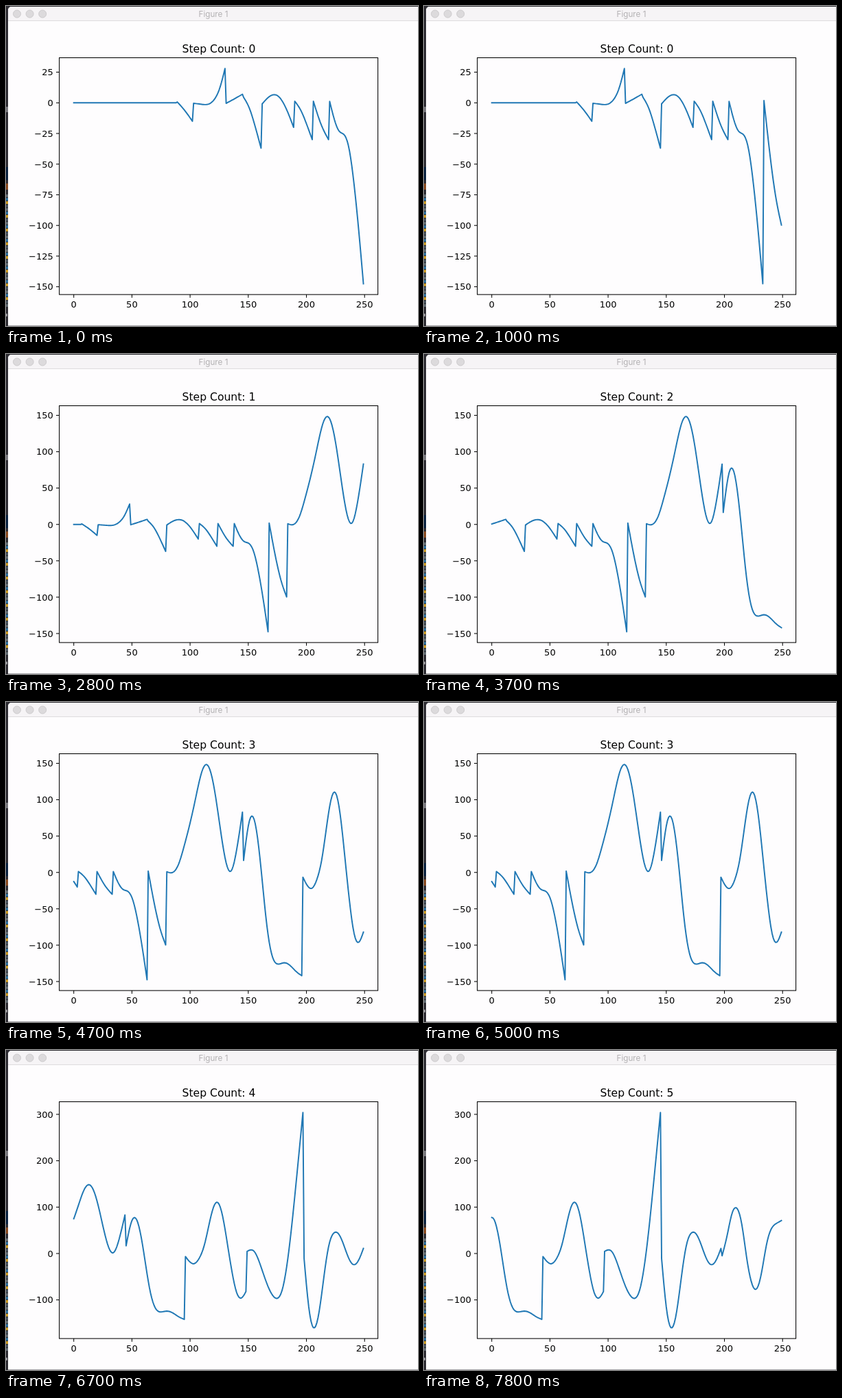
An HTML page with a canvas that plays this animation: 600 by 467 pixels, repeating every 8000 ms.

```html
<!DOCTYPE html>
<html lang="en">
<head>
<meta charset="utf-8">
<title>Figure 1</title>
<style>
html, body { margin: 0; width: 100%; height: 100%; overflow: hidden; background: #fefdfe; }
canvas { display: block; }
</style>
</head>
<body>
<canvas id="stage" width="600" height="467"></canvas>
<script>
const ctx = document.getElementById('stage').getContext('2d');
const LOOP = 8000, SPAN = 250;
const AXES = { x: 77.6, y: 75.5, w: 464, h: 345.6 };
const INK = '#000', LINE = '#1f77b4';

// Each episode is a natural cubic spline through evenly spaced knots, ending at sample `end`.
const signal = [];
function episode(end, ...v) {
  const start = signal.length, last = v.length - 1;
  const m = v.map(() => 0);
  for (let pass = 0; pass < 40; pass++)
    for (let i = 1; i < last; i++)
      m[i] = (6 * (v[i - 1] - 2 * v[i] + v[i + 1]) - m[i - 1] - m[i + 1]) / 4;
  for (let g = start; g <= end; g++) {
    const u = (g - start) / (end - start) * last;
    const i = Math.min(Math.floor(u), last - 1);
    const b = u - i, a = 1 - b;
    signal.push(a * v[i] + b * v[i + 1] + ((a ** 3 - a) * m[i] + (b ** 3 - b) * m[i + 1]) / 6);
  }
}
episode(88, 0, 0);
episode(102, 0.7, -6.4, -15);
episode(130, -0.4, -0.9, -1.4, -0.8, 3, 12, 28);
episode(145, -0.4, 3.2, 7);
episode(161, 4.5, -4.5, -19.5, -37);
episode(189, -0.8, 5.5, 5.6, -4, -20);
episode(205, 1.3, -5.8, -17, -30);
episode(219, 1.3, -17.3, -30);
episode(249, 1.2, -14, -23.3, -26, -37, -64.5, -103, -147.6);
episode(265, 1.8, -41, -76, -99.7);
episode(331, 1, 0, 11, 37, 68, 104, 138, 147.6, 122, 71, 20.5, 1.6, 31, 83);
episode(382, 16.5, 71, 67, 5, -73, -117, -126, -124.2, -128, -136, -142);
episode(435, -6.5, -18.5, -21.5, -9.5, 16, 59, 99, 109.5, 80, 22, -39, -84, -96, -82);
episode(484, 4.5, 4.8, -29, -71, -95.5, -80, 8, 149, 304);
episode(536, -11, -120, -160.5, -128, -51, 17, 44, 42, 19, -9.5, -24, -15, 11);
episode(588, -5, 38, 86, 97.5, 62, -11, -64, -76, -40, 20, 54, 65, 71);

// The plot refreshes when an episode ends: time, first visible sample, step count.
const refreshes = [
  { at: 0, first: 0, count: 0 },
  { at: 1000, first: 16, count: 0 },
  { at: 1900, first: 82, count: 1 },
  { at: 3000, first: 133, count: 2 },
  { at: 4100, first: 186, count: 3 },
  { at: 5100, first: 235, count: 3 },
  { at: 6100, first: 287, count: 4 },
  { at: 7200, first: 339, count: 5 }
];

function rect(color, x, y, w, h) {
  ctx.fillStyle = color;
  ctx.fillRect(x, y, w, h);
}

function text(str, x, y, size, align, color = INK, family = '"DejaVu Sans", sans-serif') {
  ctx.font = `${size}px ${family}`;
  ctx.textAlign = align;
  ctx.fillStyle = color;
  ctx.fillText(str, x, y);
}

function segment(x1, y1, x2, y2) {
  ctx.beginPath();
  ctx.moveTo(x1, y1);
  ctx.lineTo(x2, y2);
  ctx.stroke();
}

function drawDesktop() {
  rect('#2c2b31', 0, 0, 600, 467);
  rect('#77777c', 0, 147, 3, 8);
  rect('#08213f', 0, 235, 3, 19);
  rect('#8a4a1e', 0, 259, 3, 9);
  const bits = ['#5f6a70', '#2b6f9c', '#c99a22', '#47525c'];
  for (let y = 275, i = 0; y < 440; y += 5, i++) rect(bits[i % 4], 0, y, 3, 4);
  rect('#9a9a9e', 0, 449, 2, 4);
}

function drawWindow() {
  ctx.fillStyle = '#fefdfe';
  ctx.beginPath();
  ctx.roundRect(3, 1, 610, 480, 5);
  ctx.fill();
  ctx.fillStyle = '#f6f4f6';
  ctx.beginPath();
  ctx.roundRect(3, 1, 610, 20, [5, 0, 0, 0]);
  ctx.fill();
  rect('#dedcde', 3, 21, 597, 1);
  rect('#a5a4a7', 3, 466, 597, 1);
  ctx.lineWidth = 1;
  for (const x of [16, 34.6, 53.2]) {
    ctx.beginPath();
    ctx.arc(x, 11.5, 5.5, 0, 2 * Math.PI);
    ctx.fillStyle = '#dcdadc';
    ctx.fill();
    ctx.strokeStyle = '#cdcbcd';
    ctx.stroke();
  }
  text('Figure 1', 302, 16, 11.7, 'center', '#b3b1b3', 'Inter, sans-serif');
}

function tickStep(range) {
  const raw = range / 9;
  const unit = 10 ** Math.floor(Math.log10(raw));
  return unit * [1, 2, 2.5, 5, 10].find(k => k * unit >= raw);
}

function drawPlot({ first, count }) {
  const data = signal.slice(first, first + SPAN);
  const low = Math.min(...data), high = Math.max(...data);
  const margin = (high - low) * 0.05;
  const bottom = AXES.y + AXES.h;
  const px = i => AXES.x + AXES.w * (i / (SPAN - 1) + 0.05) / 1.1;
  const py = v => AXES.y + AXES.h * (high + margin - v) / (1.1 * (high - low));

  ctx.strokeStyle = LINE;
  ctx.lineWidth = 1.95;
  ctx.lineJoin = 'round';
  ctx.lineCap = 'square';
  ctx.beginPath();
  data.forEach((v, i) => ctx.lineTo(px(i), py(v)));
  ctx.stroke();

  ctx.strokeStyle = INK;
  ctx.lineWidth = 1.05;
  ctx.lineCap = 'butt';
  ctx.lineJoin = 'miter';
  ctx.strokeRect(AXES.x, AXES.y, AXES.w, AXES.h);

  for (let i = 0; i <= SPAN; i += 50) {
    segment(px(i), bottom, px(i), bottom + 4.6);
    text(i, px(i), 440.3, 13, 'center');
  }
  const step = tickStep(1.1 * (high - low));
  for (let v = Math.ceil((low - margin) / step) * step; v <= high + margin; v += step) {
    segment(AXES.x - 4.6, py(v), AXES.x, py(v));
    text((v < 0 ? '\u2212' : '') + Math.abs(v), AXES.x - 8.8, py(v) + 4.8, 13, 'right');
  }
  text('Step Count: ' + count, AXES.x + AXES.w / 2 + 0.4, 67.8, 15.6, 'center');
}

function render(now) {
  const t = now % LOOP;
  drawDesktop();
  drawWindow();
  drawPlot(refreshes.findLast(r => r.at <= t) || refreshes[0]);
}

const origin = performance.now();
function tick() {
  render(performance.now() - origin);
  requestAnimationFrame(tick);
}
tick();
</script>
</body>
</html>
```
